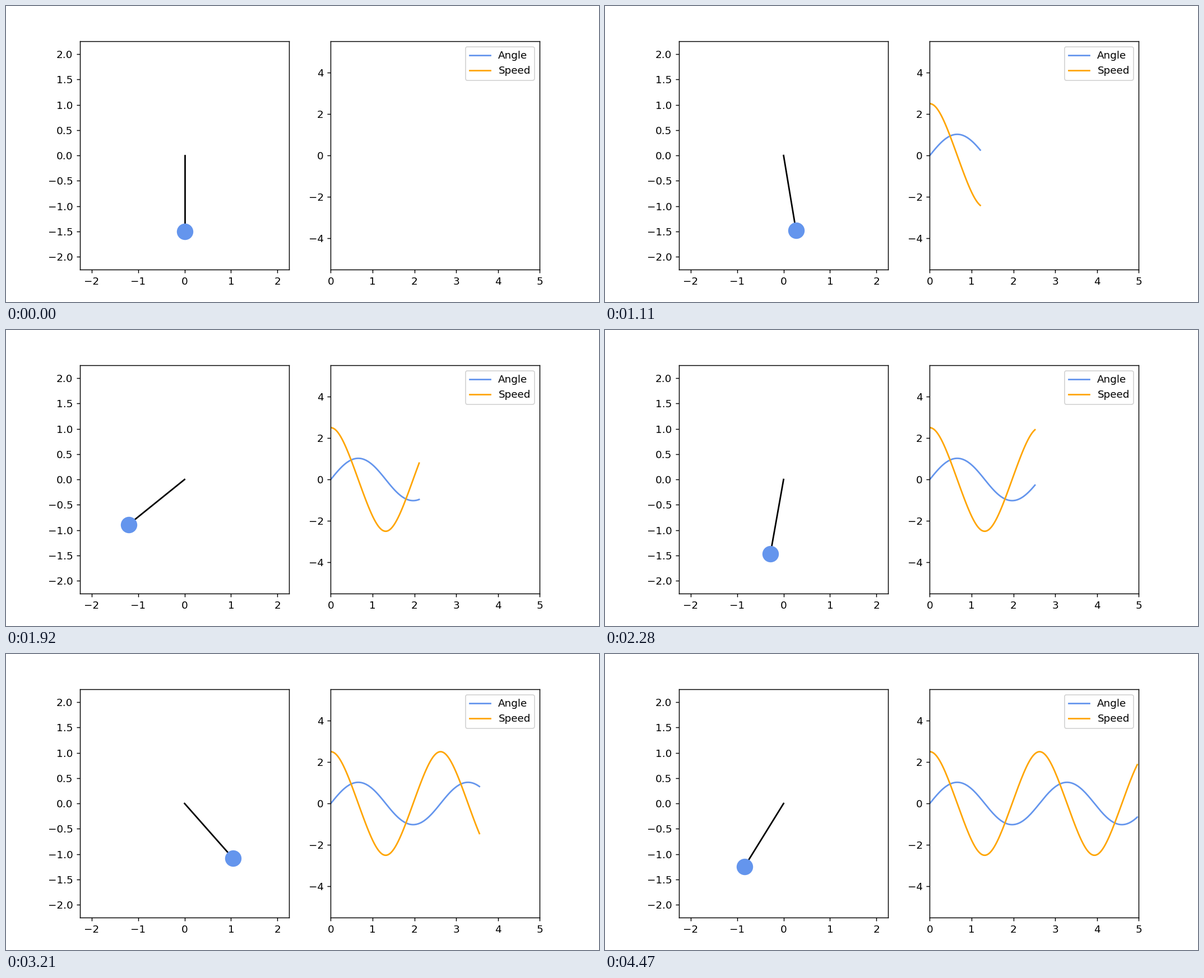
Animation, 1058 px wide and 529 px high, one loop 4.5 s. Source, as a matplotlib script:

```python
import numpy as np
import matplotlib.pyplot as plt
from matplotlib.animation import FuncAnimation

FRAMES = 150
DURATION = 5.0
GRAVITY = 9.81
LENGTH = 1.5
START = (0.0, 2.5)  # angle, angular speed
SUBSTEPS = 10


def derivative(state):
    angle, speed = state
    return np.array([speed, -GRAVITY / LENGTH * np.sin(angle)])


def rk4_step(state, h):
    k1 = derivative(state)
    k2 = derivative(state + h / 2 * k1)
    k3 = derivative(state + h / 2 * k2)
    k4 = derivative(state + h * k3)
    return state + h / 6 * (k1 + 2 * k2 + 2 * k3 + k4)


def simulate(times):
    h = (times[1] - times[0]) / SUBSTEPS
    states = [np.array(START)]
    for _ in times[1:]:
        state = states[-1]
        for _ in range(SUBSTEPS):
            state = rk4_step(state, h)
        states.append(state)
    return np.array(states).T


times = np.linspace(0, DURATION, FRAMES)
angles, speeds = simulate(times)

fig, (ax_swing, ax_plot) = plt.subplots(1, 2, figsize=(8, 4), dpi=132.25)

ax_swing.set(xlim=(-2.25, 2.25), ylim=(-2.25, 2.25))
rod, = ax_swing.plot([], [], color="black", lw=1.5)
bob, = ax_swing.plot([], [], "o", color="cornflowerblue", ms=15)

ax_plot.set(xlim=(0, DURATION), ylim=(-5.5, 5.5))
angle_line, = ax_plot.plot([], [], color="cornflowerblue", label="Angle")
speed_line, = ax_plot.plot([], [], color="orange", label="Speed")
ax_plot.legend(loc="upper right")


def update(i):
    x, y = LENGTH * np.sin(angles[i]), -LENGTH * np.cos(angles[i])
    rod.set_data([0, x], [0, y])
    bob.set_data([x], [y])
    # The curves trail the pendulum by one sample.
    angle_line.set_data(times[:i], angles[:i])
    speed_line.set_data(times[:i], speeds[:i])
    return rod, bob, angle_line, speed_line


anim = FuncAnimation(fig, update, frames=FRAMES, interval=30, repeat=True)
plt.show()
```
